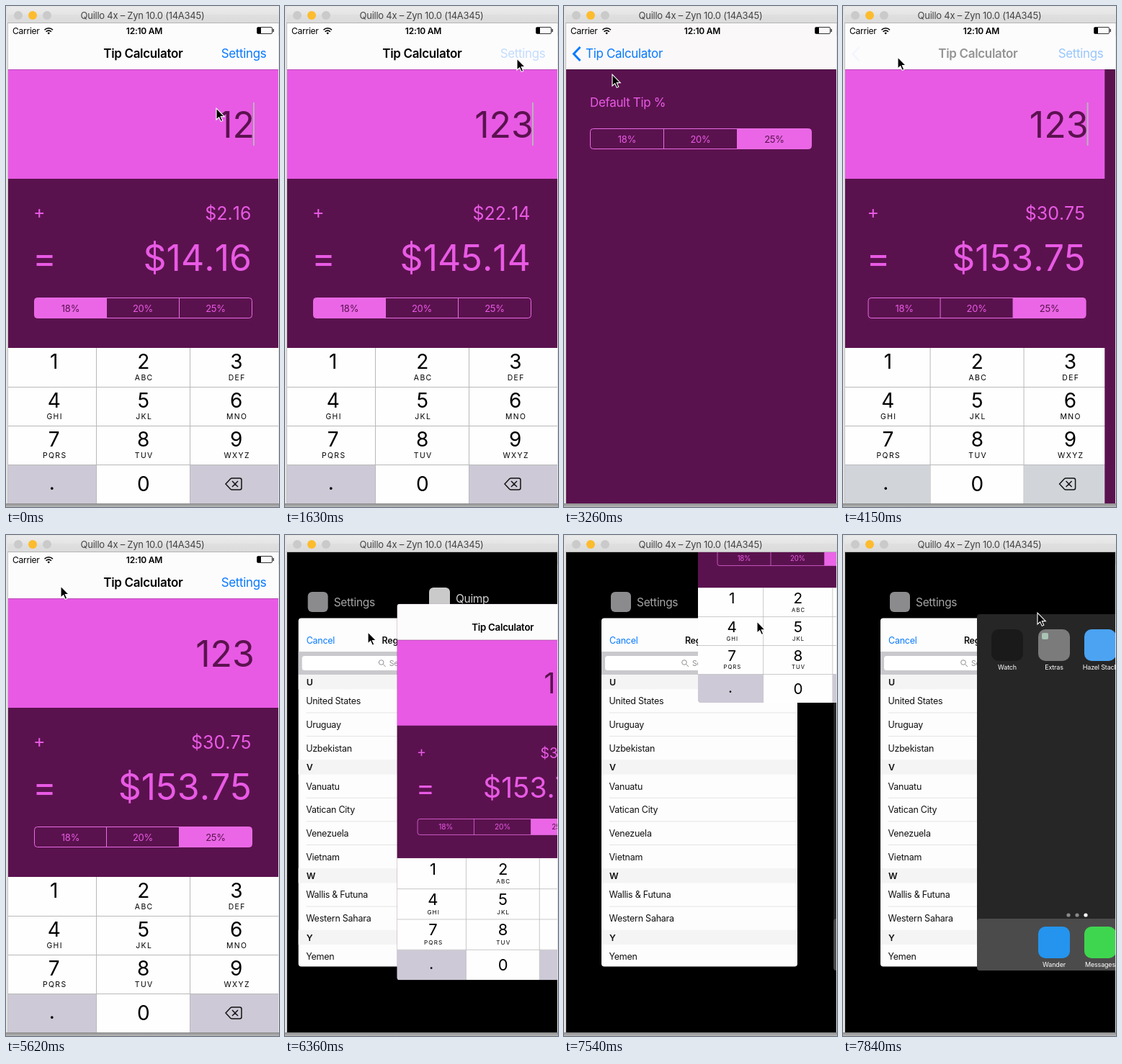
Write an HTML page that moves like this. It is 379 by 696 pixels and loops after 7.99 s.

```html
<!DOCTYPE html>
<html lang="en">
<head>
<meta charset="utf-8">
<title>Tip Calculator</title>
<style>
  html, body { margin: 0; width: 100%; height: 100%; overflow: hidden; background: #e4e4e4; }
  svg { display: block; }
  text { font-family: Inter, Roboto, "Liberation Sans", sans-serif; letter-spacing: -.02em; white-space: pre; }
  .key { letter-spacing: 1.4px; }
  .sum { letter-spacing: 0; font-kerning: none; }
</style>
</head>
<body>
<svg id="stage" width="379" height="696" viewBox="0 0 379 696">
  <defs>
    <linearGradient id="bar" x2="0" y2="1"><stop stop-color="#ebebeb"/><stop offset="1" stop-color="#d2d2d2"/></linearGradient>
    <linearGradient id="shade" x2="0" y2="1"><stop stop-color="#8c8c8c"/><stop offset="1" stop-color="#b8b8b8"/></linearGradient>
    <clipPath id="screen"><rect x="3" y="24" width="375" height="667"/></clipPath>
    <clipPath id="card"><rect id="cardBox" x="3" y="24" width="375" height="667"/></clipPath>
  </defs>
  <g id="frame"></g>
  <g id="view" clip-path="url(#screen)"></g>
  <path id="pointer" d="M0 0V16L3.7 12.6 6.3 18.4 8.8 17.3 6.3 11.6H11.3Z" stroke="#fff" stroke-width="1.1"/>
</svg>
<script>
const LOOP = 7990, TICK = 147.9;
const PINK = '#e85ae4', DARK = '#5a124e', BLUE = '#087aff';
const $ = id => document.getElementById(id);

const clamp = v => Math.max(0, Math.min(1, v));
const ramp = (t, a, b) => clamp((t - a) / (b - a));
const easeOut = u => 1 - (1 - u) ** 3;
const smooth = u => u * u * (3 - 2 * u);

const rect = (x, y, w, h, fill, attrs = '') =>
  `<rect x="${x}" y="${y}" width="${w}" height="${h}" fill="${fill}" ${attrs}/>`;
const dot = (x, y, r, fill) => `<circle cx="${x}" cy="${y}" r="${r}" fill="${fill}"/>`;
const line = (d, stroke, width = 1) =>
  `<path d="${d}" fill="none" stroke="${stroke}" stroke-width="${width}"/>`;
const text = (x, y, size, str, fill = '#000', attrs = '') =>
  `<text x="${x}" y="${y}" font-size="${size}" fill="${fill}" ${attrs}>${str}</text>`;
const group = (body, dx = 0, dy = 0, alpha = 1) =>
  `<g transform="translate(${dx} ${dy})" opacity="${alpha}">${body}</g>`;
const MID = 'text-anchor="middle" ', END = 'text-anchor="end" ', BOLD = 'font-weight="600" ';
const SUM = END + 'class="sum"';

// time, x, y of the mouse pointer tip
const PATH = [
  [0, 292, 142], [300, 292, 142], [1180, 322, 73], [2250, 322, 73], [2800, 298, 182],
  [3000, 298, 182], [3254, 67, 95], [3420, 76, 71], [6060, 76, 71], [6950, 224, 313],
  [7110, 225, 315], [7550, 268, 120], [7838, 270, 108]
];

function pointerAt(t) {
  const i = PATH.findIndex(k => k[0] > t);
  if (i < 0) return PATH[PATH.length - 1].slice(1);
  const [a, b] = [PATH[i - 1], PATH[i]];
  const u = smooth(ramp(t, a[0], b[0]));
  return [1, 2].map(k => a[k] + (b[k] - a[k]) * u);
}

function segments(x, y, w, sel) {
  const h = 28, edge = i => x + Math.floor(i * w / 3);
  const a = edge(sel), b = edge(sel + 1);
  const l = sel == 0 ? 4 : 0, r = sel == 2 ? 4 : 0;
  const fill = `M${a + l} ${y}H${b - r}q${r} 0 ${r} ${r}V${y + h - r}q0 ${r} ${-r} ${r}H${a + l}` +
    `q${-l} 0 ${-l} ${-l}V${y + l}q0 ${-l} ${l} ${-l}Z`;
  return `<path d="${fill}" fill="#ea66e6"/>` +
    rect(x, y, w, h, 'none', 'rx="4" stroke="#e86ce4"') +
    line(`M${edge(1)} ${y}v${h}M${edge(2)} ${y}v${h}`, '#e86ce4') +
    ['18%', '20%', '25%'].map((s, i) =>
      text((edge(i) + edge(i + 1)) / 2, y + 19, 13, s, i == sel ? DARK : PINK, MID)).join('');
}

function keypad(tint) {
  const letters = ['', 'ABC', 'DEF', 'GHI', 'JKL', 'MNO', 'PQRS', 'TUV', 'WXYZ'];
  const cols = [66.5, 190.5, 319.5];
  return rect(3, 475, 375, 216, '#fefefe') +
    rect(3, 638, 122, 53, tint) + rect(256, 638, 122, 53, tint) +
    line('M3 529.5H378M3 583.5H378M3 637.5H378M125.5 475V691M255.5 475V691', '#b9b9bb') +
    letters.map((s, i) => {
      const x = cols[i % 3], y = 504 + 54 * Math.floor(i / 3);
      return text(x, y, 28, i + 1, '#000', MID) +
        text(x + 1.2, y + 16, 10.4, s, '#000', MID + 'class="key"');
    }).join('') +
    text(190.5, 674, 28, 0, '#000', MID) + text(63.5, 672, 28, '.', '#000', MID) +
    line('M305 664l6.5-7q1-1 2.5-1H324.5q2.5 0 2.5 2.5V669.5q0 2.5-2.5 2.5H314q-1.5 0-2.5-1Z' +
      'M314 660l8 8m0-8l-8 8', '#111', 1.5);
}

function calculator(bill, sel, caret, tint) {
  const tip = bill * [.18, .2, .25][sel];
  return rect(3, 88, 375, 152, PINK) + rect(3, 240, 375, 235, DARK) +
    text(345, 183, 50, bill, DARK, SUM) +
    (caret ? rect(343, 134, 2, 60, '#b9b2bb') : '') +
    text(38, 295, 25, '+', PINK) + text(340.5, 297, 25, '$' + tip.toFixed(2), PINK, SUM) +
    text(37, 368, 50, '=', PINK) + text(341, 368, 50, '$' + (bill + tip).toFixed(2), PINK, SUM) +
    segments(39.5, 405.5, 302, sel) + keypad(tint);
}

const preferences = sel => rect(3, 88, 375, 603, DARK) +
  text(36, 139.5, 17, 'Default Tip %', PINK) + segments(36.5, 170.5, 307, sel);

const statusBar = () => text(9, 38.5, 12, 'Carrier') + text(192, 38.5, 12, '12:10 AM', '#000', MID + BOLD) +
  line('M53.5 33.2a8 8 0 0 1 11.5 0M55.6 35.7a5 5 0 0 1 7.3 0', '#000', 1.6) + dot(59.2, 37.8, 1.4, '#000') +
  rect(348.5, 29.5, 21, 9, 'none', 'rx="1.5" stroke="#333"') + rect(349, 30, 5, 8, '#000') +
  rect(370.5, 32, 1.5, 4, '#333');

// p: 0 on the calculator, 1 on the preferences
function navBar(p, press) {
  const shown = clamp(1 - 15 * p);
  return rect(3, 24, 375, 64, '#fff', `opacity="${.99 - .02 * p}"`) +
    rect(3, 88, 375, 1, '#000', 'opacity=".2"') +
    group(text(190.3, 72, 17, 'Tip Calculator', '#000', MID + BOLD), -75 * p, 0, shown) +
    group(text(361.5, 72, 17, 'Settings', BLUE, END), 0, 0, shown * press) +
    group(line('M22.5 57L13.5 66.5 22.5 76', BLUE, 3), 0, 0, p) +
    group(text(30, 72, 17, 'Tip Calculator', BLUE), 105 * (1 - p), 0, p * p);
}

function regionCard() {
  const list = {
    U: ['United States', 'Uruguay', 'Uzbekistan'],
    V: ['Vanuatu', 'Vatican City', 'Venezuela', 'Vietnam'],
    W: ['Wallis &amp; Futuna', 'Western Sahara'],
    Y: ['Yemen']
  };
  let y = 194, out = '';
  for (const [letter, rows] of Object.entries(list)) {
    out += rect(52, y, 272, 20.3, '#f4f4f5') + text(63, y + 15, 12.4, letter, '#111', BOLD);
    y += 20.3;
    rows.forEach((name, i) => {
      if (i) out += line(`M63 ${y}H324`, '#dedee0', .8);
      out += text(62.5, y + 21, 12.5, name, '#111');
      y += 32.65;
    });
  }
  return rect(52, 115.5, 272, 484, '#fdfdfd', 'rx="4"') +
    text(63, 150.5, 12.5, 'Cancel', BLUE) + text(188, 150.5, 12.5, 'Region', '#111', MID + BOLD) +
    rect(52, 162, 272, 32, '#c9c9cd') + rect(57, 168, 262, 20, '#fff', 'rx="3.5"') +
    '<circle cx="167" cy="177" r="3.3" fill="none" stroke="#8e8e93"/>' + line('M169.5 179.5l3.5 3.5', '#8e8e93') +
    text(178, 182, 10.5, 'Search', '#8e8e93') + out +
    rect(65, 79, 28, 28, '#8b8b8e', 'rx="6"') + text(101, 99, 15.5, 'Settings', '#a6a6a6');
}

function homeCard() {
  const app = (x, y, fill, name) => rect(x, y, 44, 44, fill, 'rx="10"') +
    text(x + 22, y + 56, 9, name, '#fff', MID);
  return rect(186, 110, 277, 495, '#262626', 'rx="4"') +
    rect(186, 533, 277, 72, '#4b4b4b', 'rx="4"') +
    app(206, 131, '#1a1a1a', 'Watch') + app(271, 131, '#7b7b7b', 'Extras') +
    rect(276, 136, 9, 9, '#a9c4b4', 'rx="2"') + app(335, 131, '#4ba3f2', 'Hazel Stack') +
    app(271, 544, '#2494ee', 'Wander') + app(335, 544, '#3fd64f', 'Messages') +
    dot(313, 528, 2.6, '#8a8a8a') + dot(325, 528, 2.6, '#8a8a8a') + dot(337, 528, 2.6, '#fff');
}

function render(t) {
  const slide = easeOut(ramp(t, 1990, 2840)) - easeOut(ramp(t, 3580, 4430));
  const shrink = easeOut(ramp(t, 6000, 6800));
  const fling = 600 * (Math.max(0, t - 7150) / 500) ** 2;
  const home = easeOut(ramp(t, 7500, 7820));

  const caret = !(t > 1000 && t < 1600 || t > 4500 && t < 5000 || t > 5600);
  const tint = t > 1990 && t < 4500 ? '#d1d5da' : '#cdc9d6';
  const calc = calculator(t < 140 ? 12 : 123, t < 3500 ? 0 : 2, caret, tint);

  const app = rect(3, 24, 375, 667, DARK) +
    group(calc, -112.5 * slide) +
    (slide > 0 ? group(preferences(t < 2900 ? 0 : 2), 375 * (1 - slide)) : '') +
    navBar(slide, t > 1450 && t < 3000 ? .24 : 1) +
    (shrink ? '' : statusBar());
  const x = 3 + 183 * shrink, y = 24 + 86 * shrink - fling, scale = 1 - .26 * shrink;
  const label = rect(200, 73, 29, 29, '#f3f3f3', 'rx="6"') + text(237, 93.5, 15.5, 'Quimp', '#fff');

  $('cardBox').setAttribute('rx', 6 * shrink);
  $('view').innerHTML = rect(3, 24, 375, 667, '#000') +
    (shrink ? group(regionCard(), -200 * (1 - shrink)) +
      group(homeCard(), 290 * (1 - home)) +
      group(label, 0, -fling, shrink * clamp(1 - fling / 250)) : '') +
    `<g transform="translate(${x} ${y}) scale(${scale}) translate(-3 -24)" clip-path="url(#card)">${app}</g>`;
  $('pointer').setAttribute('transform', `translate(${pointerAt(t)})`);
}

$('frame').innerHTML = rect(0, 0, 379, 696, '#e4e4e4') + rect(0, 691, 379, 5, 'url(#shade)') +
  rect(2, 1, 382, 40, 'url(#bar)', 'rx="5"') + rect(2, 12, 377, 12, '#d6d6d6', 'opacity=".4"') +
  line('M2 23.5H379', '#b4b4b4') + line('M2.5 24V691', '#c4c4c4') +
  dot(17, 13, 6, '#cacaca') + dot(37, 13, 6, '#fdbc2e') + dot(57, 13, 6, '#cacaca') +
  text(189.5, 18, 13, 'Quillo 4x – Zyn 10.0 (14A345)', '#444', MID);

let last = -1;
const start = performance.now();
function loop() {
  const step = Math.min(53, Math.floor(((performance.now() - start) % LOOP + 6) / TICK));
  if (step != last) render((last = step) * TICK);
  requestAnimationFrame(loop);
}
loop();
</script>
</body>
</html>
```
